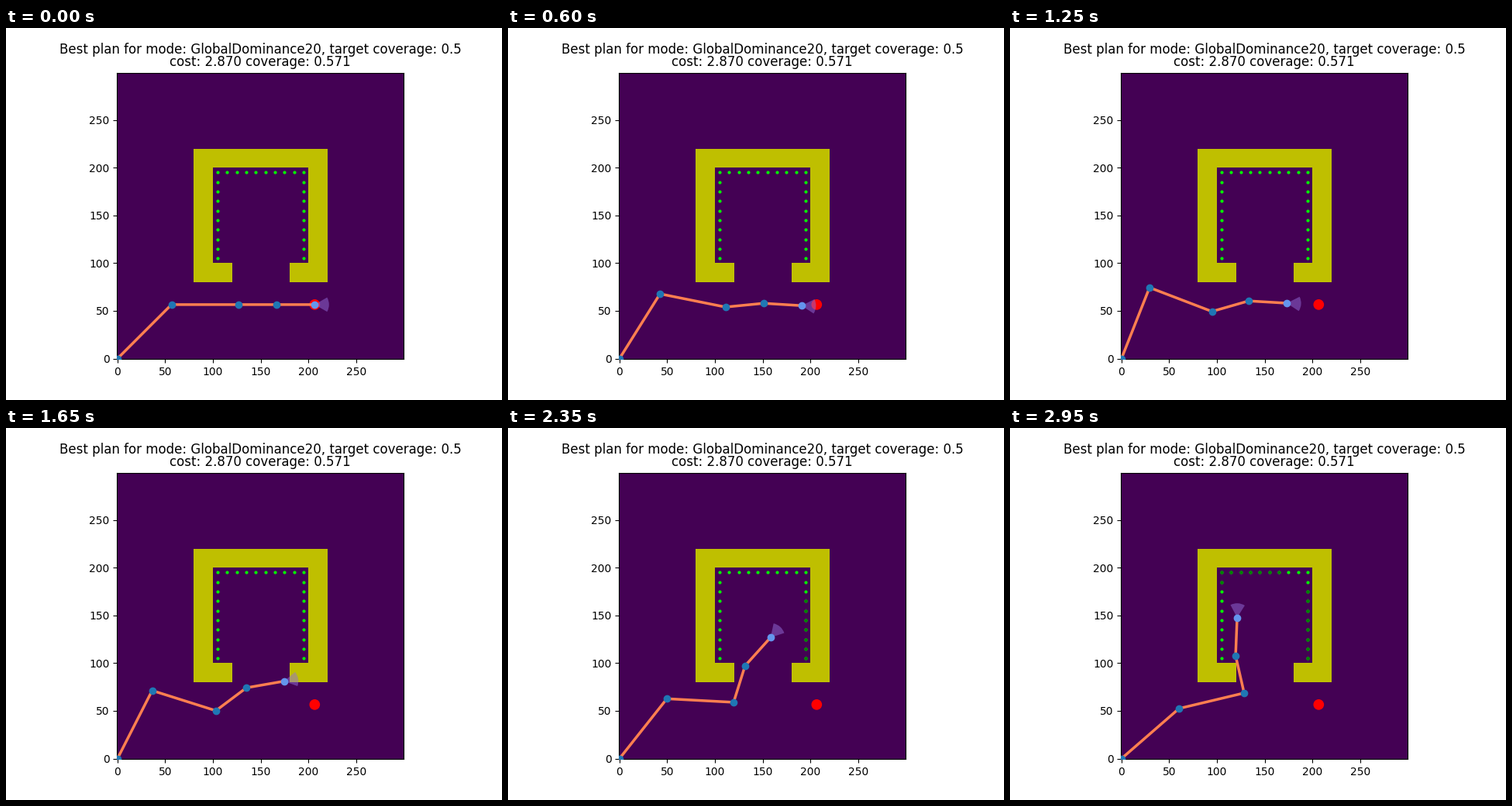
A matplotlib script for the animation above (3000 ms loop, 640 by 480 pixels).

```python
import numpy as np
import matplotlib.pyplot as plt
from matplotlib.animation import FuncAnimation
from matplotlib.patches import Circle, Rectangle, Wedge

FRAMES, INTERVAL = 60, 50
LINKS = np.array([80, 70, 40, 40])
FOV, SIGHT, FAN_RADIUS = 30, 60, 15

# Joint angles (degrees) at the waypoints of the plan
WAY_TIMES = [0, 23, 38, 59]
WAYPOINTS = np.array([
    [45, -45, 0, 0],
    [69.8, -91.6, 32.6, -17.5],
    [59.6, -75, 65.3, -31.7],
    [41, -27.6, 89.5, -15.2],
])

# x, y, width, height of the walls
WALLS = [(80, 200, 140, 20), (80, 80, 20, 120), (200, 80, 20, 120),
         (100, 80, 20, 20), (180, 80, 20, 20)]

steps = np.arange(105, 196, 10)
DOTS = np.array([(105, y) for y in steps]
                + [(x, 195) for x in steps[1:-1]]
                + [(195, y) for y in steps[::-1]])


def arm(frame):
    """Joint positions and heading of the last link."""
    joints = [np.interp(frame, WAY_TIMES, q) for q in WAYPOINTS.T]
    heading = np.cumsum(joints)
    rad = np.radians(heading)
    moves = LINKS[:, None] * np.column_stack([np.cos(rad), np.sin(rad)])
    points = np.vstack([[0, 0], np.cumsum(moves, axis=0)])
    return points, heading[-1]


def blocked(a, b):
    """True if a wall stands between a and b."""
    ray = a + np.linspace(0, 1, 200)[:, None] * (b - a)
    x, y = ray.T
    return any(np.any((x > wx) & (x < wx + w) & (y > wy) & (y < wy + h))
               for wx, wy, w, h in WALLS)


def visible(frame):
    points, heading = arm(frame)
    tip = points[-1]
    dx, dy = (DOTS - tip).T
    turn = (np.degrees(np.arctan2(dy, dx)) - heading + 180) % 360 - 180
    near = (np.hypot(dx, dy) < SIGHT) & (np.abs(turn) < FOV)
    return np.array([n and not blocked(tip, d) for n, d in zip(near, DOTS)])


covered = np.logical_or.accumulate([visible(f) for f in range(FRAMES)])

plt.rcParams["text.kerning_factor"] = 6
fig, ax = plt.subplots(figsize=(6.4, 4.8), dpi=100)
ax.set(xlim=(-0.5, 299.5), ylim=(-0.5, 299.5), aspect="equal",
       xticks=range(0, 300, 50), yticks=range(0, 300, 50),
       facecolor="#440154")
ax.set_title("Best plan for mode: GlobalDominance20, target coverage: 0.5\n"
             "cost: 2.870 coverage: 0.571", linespacing=0.91)

for x, y, w, h in WALLS:
    ax.add_patch(Rectangle((x, y), w, h, color="y", lw=0))

start = arm(0)[0][-1]
ax.add_patch(Circle(start, 5, color="red", lw=1, zorder=2))
fan = ax.add_patch(Wedge(start, FAN_RADIUS, -FOV, FOV, fc="mediumpurple",
                         ec="none", alpha=0.5, zorder=3))
ax.plot(*DOTS.T, "o", color="lime", ms=2, zorder=2)
seen, = ax.plot([], [], "o", color="green", ms=2, zorder=2)
bars, = ax.plot([], [], color="coral", lw=2.5, zorder=4)
hinges, = ax.plot([], [], "o", color="C0", ms=6, zorder=5)
hand, = ax.plot([], [], "o", color="cornflowerblue", ms=6, zorder=6)


def update(frame):
    points, heading = arm(frame)
    bars.set_data(*points.T)
    hinges.set_data(*points[:-1].T)
    hand.set_data(*points[-1:].T)
    fan.set_center(points[-1])
    fan.set_theta1(heading - FOV)
    fan.set_theta2(heading + FOV)
    seen.set_data(*DOTS[covered[frame]].T)
    return bars, hinges, hand, fan, seen


anim = FuncAnimation(fig, update, frames=FRAMES, interval=INTERVAL,
                     repeat=True, repeat_delay=0)
plt.show()
```
